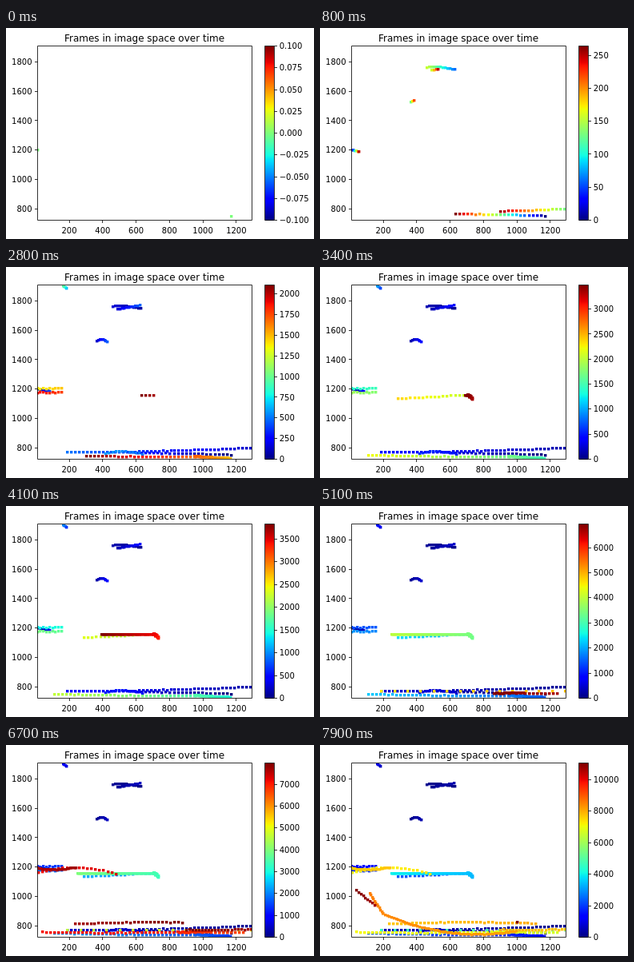
These frames come from a looping animation (385 px wide and 264 px high, 8000 ms). An HTML page with a canvas:

```html
<!DOCTYPE html>
<html lang="en">
<head>
<meta charset="utf-8">
<title>Frames in image space over time</title>
<style>
  html, body { margin: 0; width: 100%; height: 100%; overflow: hidden; background: #fff; }
  canvas, svg { position: absolute; left: 0; top: 0; width: 385px; height: 264px; }
  text { font: 10px "DejaVu Sans", sans-serif; fill: #000; }
  .title { font-size: 12px; text-anchor: middle; }
  .x { text-anchor: middle; }
  .y { text-anchor: end; }
  path { fill: none; stroke: #000; stroke-width: .8; }
</style>
</head>
<body>
<canvas id="plot" width="385" height="264"></canvas>
<svg viewBox="0 0 385 264">
  <text class="title" x="173" y="17">Frames in image space over time</text>
  <path d="M39.5 22.5H307.5V240.5H39.5ZM323.5 22.5H335.5V240.5H323.5Z"/>
  <g id="axes"></g>
  <g id="scale"></g>
</svg>
<script>
const LOOP = 8000, STEP = 100, PER_STEP = 8;
const LEFT = 39, TOP = 23, BOTTOM = 240, RIGHT = 307;
const ctx = document.getElementById('plot').getContext('2d');
const px = x => 37.3 + x * 0.2088;
const py = y => 226.3 - (y - 800) * 0.184;
const clamp = v => Math.max(0, Math.min(1, v));

function jet(p) {
  const r = Math.min((p - .35) / .31, 1 - (p - .89) / .22);
  const g = Math.min((p - .125) / .25, (.91 - p) / .27);
  const b = Math.min(.5 + p / .22, (.65 - p) / .31);
  return `rgb(${[r, g, b].map(c => Math.round(255 * clamp(c)))})`;
}

let seed = 7;
const random = () => (seed = seed * 16807 % 2147483647) / 2147483647;

// One dot every `gap` pixels and every `every` counts, along a bent line
const points = [];
function track(start, every, gap, [x0, y0], [x1, y1], bend = 0, wobble = 3) {
  const steps = Math.round(Math.hypot(px(x1) - px(x0), py(y1) - py(y0)) / gap);
  for (let i = 0; i <= steps; i++) {
    const k = steps ? i / steps : 0;
    const x = x0 + (x1 - x0) * k;
    const y = y0 + (y1 - y0) * k + 4 * bend * k * (1 - k) + (random() - .5) * wobble;
    points.push({ v: start + every * i, x: px(x), y: py(y) });
  }
}

// Lower lane
track(0, 12, 5, [1170, 752], [560, 768]);
track(130, 8, 5, [1285, 798], [190, 768], -6);
track(500, 8, 4, [640, 757], [420, 762], 15);
track(1480, 5, 1, [1165, 728], [950, 742]);
track(1675, 16, 5, [950, 738], [110, 750], -4);
track(4600, 25, 16, [190, 770], [1290, 772]);
track(6700, 12, 5, [1240, 752], [1050, 757]);
track(6800, 5, 1.3, [1040, 758], [860, 757]);
track(6950, 6, 5, [850, 757], [40, 757], -5);
track(7740, 11, 4, [1290, 773], [900, 772]);
track(7740, 8.5, 5, [235, 813], [1115, 817], 8);

// Upper clusters
track(60, 8, 3, [630, 1745], [460, 1762], 10);
track(160, 30, 3, [490, 1742], [625, 1768]);
track(130, 45, 2, [365, 1525], [430, 1520], 15);
track(630, 110, 2, [185, 1885], [165, 1903]);

// Left edge and middle
track(0, 50, 2, [10, 1200], [85, 1185]);
track(1380, 12, 4, [10, 1202], [155, 1203]);
track(1780, 14, 4, [155, 1175], [10, 1175]);
track(2040, 20, 5, [705, 1158], [290, 1135]);
track(3350, 5.5, .4, [735, 1130], [705, 1165], 0, 20);
track(3470, 6.2, 1.1, [700, 1158], [250, 1155]);
track(7160, 10, 5, [15, 1163], [480, 1155], 36);
track(7620, 6, 2.2, [10, 1192], [240, 1198], -14);

// Long curve up to the left
track(8150, 5, 2.7, [1000, 765], [200, 882], -70);
track(8470, 10, 2.7, [200, 882], [120, 1020]);
track(10720, 40, 3.5, [150, 940], [40, 1040]);
track(11050, 1, 1, [1005, 828], [1005, 828]);
points.sort((a, b) => a.v - b.v);

const label = (cls, x, y, s) => `<text class="${cls}" x="${x}" y="${y}">${s}</text>`;
const snap = v => Math.floor(v) + .5;

let axes = '';
for (let v = 200; v <= 1200; v += 200)
  axes += `<path d="M${snap(px(v))} 240.5v3.5"/>` + label('x', px(v), 257, v);
for (let v = 800; v <= 1800; v += 200)
  axes += `<path d="M39.5 ${snap(py(v))}h-3.5"/>` + label('y', 32.5, py(v) + 3.6, v);
document.getElementById('axes').innerHTML = axes;

// Smallest round step that leaves at most nine intervals
function tickStep(range) {
  const raw = range / 9, base = 10 ** Math.floor(Math.log10(raw));
  return base * [1, 2, 2.5, 5, 10].find(m => m * base >= raw - 1e-9);
}

function drawScale(max) {
  const lo = max ? 0 : -.1, hi = max || .1;
  const step = max ? tickStep(max) : .025;
  const digits = max ? (step % 1 ? 1 : 0) : 3;
  let out = '';
  for (let i = 0; lo + i * step <= hi + 1e-9; i++) {
    const v = lo + i * step, y = 240.5 - 218 * (v - lo) / (hi - lo);
    const s = (Math.abs(v) < 1e-9 ? 0 : v).toFixed(digits).replace('-', '\u2212');
    out += `<path d="M335.5 ${snap(y)}h3.5"/>` + label('c', 341.7, y + 3.6, s);
  }
  document.getElementById('scale').innerHTML = out;
}

function drawDots(dots, max) {
  ctx.clearRect(0, 0, 385, 264);
  for (let y = 0; y < 218; y++) {
    ctx.fillStyle = jet(1 - y / 217);
    ctx.fillRect(324, TOP + y, 11, 1);
  }
  ctx.save();
  ctx.beginPath();
  ctx.rect(LEFT, TOP, RIGHT - LEFT, BOTTOM - TOP);
  ctx.clip();
  for (const p of dots) {
    ctx.fillStyle = jet(max ? p.v / max : .5);
    ctx.fillRect(Math.round(p.x - 1.7), Math.round(p.y - 1.7), 3.4, 3.4);
  }
  ctx.restore();
}

let shown = -1;
function tick(now) {
  const step = Math.floor(now % LOOP / STEP);
  if (step !== shown) {
    shown = step;
    const dots = points.slice(0, 2 + PER_STEP * step);
    const max = dots[dots.length - 1].v;
    drawDots(dots, max);
    drawScale(max);
  }
  requestAnimationFrame(tick);
}
tick(performance.now());
</script>
</body>
</html>
```
